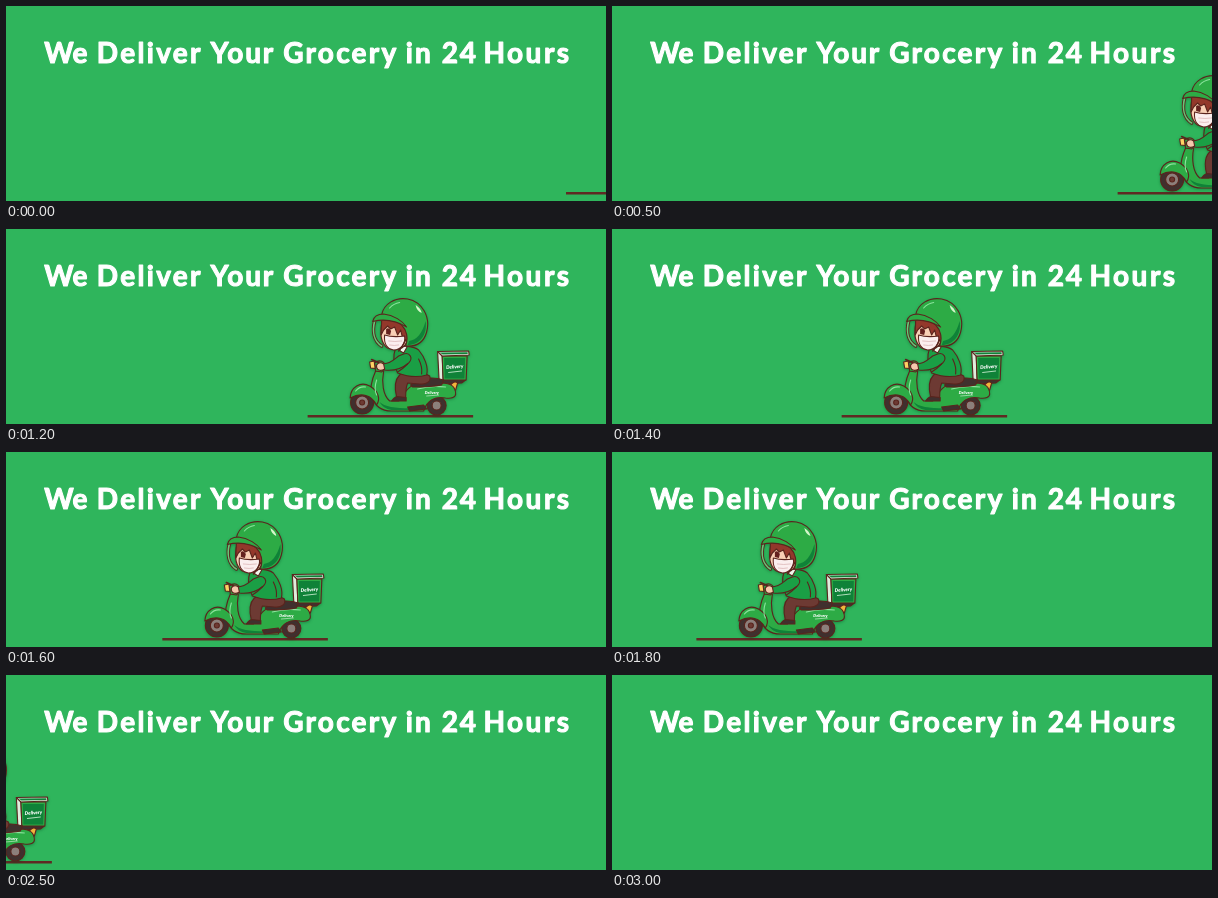
An HTML page that plays this animation: 600 px wide and 195 px high, repeating every 3100 ms.

```html
<!DOCTYPE html>
<html lang="en">
<head>
<meta charset="utf-8">
<title>Grocery delivery banner</title>
<style>
  html, body { margin: 0; width: 100%; height: 100%; overflow: hidden; background: #2fb55c; }
  svg { display: block; width: 600px; height: 195px; }
  .title { font: 700 28px Lato, sans-serif; fill: #fff; stroke: #fff; stroke-width: 1.1; stroke-linejoin: round; }
  .art { stroke: #5a241d; stroke-width: 1.1; stroke-linejoin: round; stroke-linecap: round; }
  .shade { filter: drop-shadow(.8px 1.5px 1.5px rgba(0, 70, 30, .4)); }
  .light { fill: #2dab45; }
  .green { fill: #1a9f45; }
  .deep { fill: #0f8238; }
  .brown { fill: #6d3a33; }
  .dark { fill: #40302e; }
  .plain { stroke: none; }
  .line { fill: none; }
  .shine { fill: none; stroke: #8be39d; stroke-width: 1.1; }
  .label { font: italic 900 4.9px Lato, sans-serif; fill: #fff; stroke: none; }
</style>
</head>
<body>
<svg viewBox="0 0 600 195">
  <rect width="600" height="195" fill="#2fb55c"/>
  <g class="title" id="title"></g>
  <g id="ride">
    <rect x="302" y="186" width="165.5" height="2.5" fill="#5f2a23"/>
    <g class="art shade">
      <!-- crate -->
      <path class="dark" d="M426 152L437 148L460 151L456 154L432 155Z"/>
      <path fill="#dfeedd" d="M432 122.5H436.5L437.5 151.5H433.5Z"/>
      <path class="light" d="M436.5 127H461.5L460.5 151H437.5Z"/>
      <path fill="#e9f5e6" d="M432 122.5L463 122L463.5 126L436.5 127Z"/>
      <path class="deep plain" d="M434 123.6L462 123.2V125L437 125.6Z"/>
      <path class="deep plain" d="M438.5 129H459.5L458.8 149.5H439Z"/>
      <text class="label" x="440.5" y="140" transform="rotate(-4 440 140)">Delivery</text>
      <path class="line" d="M443 143.5L456 142" style="stroke:#d8f5dc;stroke-width:.8"/>

      <!-- wheels -->
      <circle class="dark" cx="356.5" cy="173.5" r="11.5"/>
      <circle cx="356.5" cy="173.5" r="6.5" fill="#8c7f7b"/>
      <circle class="brown" cx="356.5" cy="173.5" r="2.5"/>
      <circle class="dark" cx="431" cy="176.5" r="9.5"/>
      <circle cx="431" cy="176.5" r="4.5" fill="#8c7f7b"/>

      <!-- scooter -->
      <path d="M445 156Q449 151 452 154L450 161L446 162Z" fill="#f1b43c"/>
      <path class="light" d="M370 142C366 151 364 159 366 167C369 177 376 182 386 182H418C421 171 430 167 440 169C446 170 450 168 450 165C450 157 444 154 436 154L408 156C400 159 398 167 393 172H384C377 166 376 153 378 142Z"/>
      <path class="deep plain" d="M374 173C380 179 396 180 418 179L417.5 181H386C380 180 376 177 374 173Z"/>
      <path class="light" d="M344.5 169C345 158 355 152 364 157C373 162 375 170 371 176C366 166 356 163 344.5 169Z"/>
      <path class="shine" d="M350 162Q354 157 360 158M371 151Q368 160 371 166M412 160Q425 156 440 158"/>
      <path class="dark" d="M405 156C412 149 427 147 438 151L436 156C426 158 416 158 407 158Z"/>
      <text class="label" x="419" y="164.5" style="font-size:4px">Delivery</text>
      <path class="line" d="M421 167L433 166" style="stroke:#d8f5dc;stroke-width:.6"/>
      <path class="dark" d="M402 178L418 176L421 180L404 182Z"/>
      <path class="light" d="M369 134C374 130 379 132 380 138L376 143L370 142Z"/>
      <path d="M368.5 132L364 133L365 139L369.5 139.5Z" fill="#ffd264"/>
      <path class="line" d="M374 134L366 130.5" stroke-width="1.6"/>

      <!-- rider -->
      <path class="brown" d="M394 146C402 141 416 142 424 147C426 152 421 156 414 155L402 154C400 159 400 164 400 169L391 168C389 160 389 151 394 146Z"/>
      <path class="dark" d="M391 167.5L400.5 168.5V172H386C387 170 389 168.5 391 167.5Z"/>
      <path class="green" d="M390 119C396 116 408 117 413 121C419 128 423 138 421 146C411 149 400 147 392 144C388 136 387 127 390 119Z"/>
      <path class="green" d="M398 125C404 123 408 129 403 134C396 140 388 142 379 141L377 135C385 135 389 130 393 127Z"/>
      <path class="line" d="M402 135Q397 140 392 143M413 130Q417 138 416 145"/>
      <path d="M378 135C374 132 370 135 371 138.5C372 142 376 142 379 140Z" fill="#f6c9ad"/>
      <path d="M394 118L402 117L398 124L394.5 122Z" fill="#eff7ec"/>

      <!-- head -->
      <path d="M376 95C374 106 375 114 382 119C391 123 399 119 401 113L399 93Z" fill="#f8cfb5"/>
      <path class="plain" d="M380.5 100Q383.5 98 385.5 102L384.5 106L380.5 105Z" fill="#64211f"/>
      <path fill="#93382b" d="M376 91C384 90 396 92 401 98L402 113L397 109L395 101L392 106L389 98L385 100L382 97L378 101L375.5 106Z"/>
      <path d="M379 106C385 108 392 108 399 107C400 114 396 121 388 121C382 120 378 115 379 106Z" fill="#fbeeee"/>
      <path class="line" d="M383 112Q389 113 396 112M384 116Q389 117 393 116" style="stroke:#dcb5b7;stroke-width:.8"/>
      <path class="light" d="M376 86C378 75 389 68 402 70C417 73 425 88 421 103C418 114 411 118 400 117C403 109 401 101 396 96C390 91 383 88 376 86Z"/>
      <path class="deep plain" d="M420 92C422 106 414 116 402 116L403.5 112C411 111 417 104 420 92Z"/>
      <path class="line" d="M369 92C366.5 102 368 112 376 117" stroke-width="3.4"/>
      <path class="line" d="M369 92C366.5 102 368 112 376 117" style="stroke:#66c879;stroke-width:1.6"/>
      <path class="light" d="M367 92.5C368 88 372 85 378 85C388 86 397 92 401 98C391 92 379 89.5 367 92.5Z"/>
      <path class="line" d="M400 111Q397 118 393 122" stroke-width="1.4"/>
      <path class="shine" d="M384 79Q388 74.5 394 73.5"/>
      <path class="plain" d="M410 76Q415 79 416 84Q411 82 410 76Z" fill="#d5f7ca"/>
    </g>
  </g>
</svg>
<script>
const NS = "http://www.w3.org/2000/svg";
const LOOP = 3100, STEP = 100, TRAVEL = 3000;
const START = 560, END = -174, BASE = 302;

// word, left edge, letter spacing
const words = [
  ["We", 38.3, .6], ["Deliver", 90.8, 2.3], ["Your", 204.5, 1.8], ["Grocery", 277.3, 2.2],
  ["in", 399.8, 2], ["24", 435.8, 1.6], ["Hours", 477.4, 2.5]
];
for (const [word, x, gap] of words) {
  const el = document.createElementNS(NS, "text");
  el.setAttribute("x", x);
  el.setAttribute("y", 57);
  el.setAttribute("letter-spacing", gap);
  el.textContent = word;
  document.getElementById("title").append(el);
}

const ride = document.getElementById("ride");
const smooth = u => u * u * (3 - 2 * u);

function draw(ms) {
  const t = Math.floor((ms % LOOP) / STEP) * STEP;
  const x = START + (END - START) * smooth(t / TRAVEL);
  ride.setAttribute("transform", `translate(${(x - BASE).toFixed(2)} 0)`);
}

let origin;
function tick(now) {
  origin ??= now;
  draw(Math.max(0, now - origin));
  requestAnimationFrame(tick);
}
draw(0);
requestAnimationFrame(tick);
</script>
</body>
</html>
```
